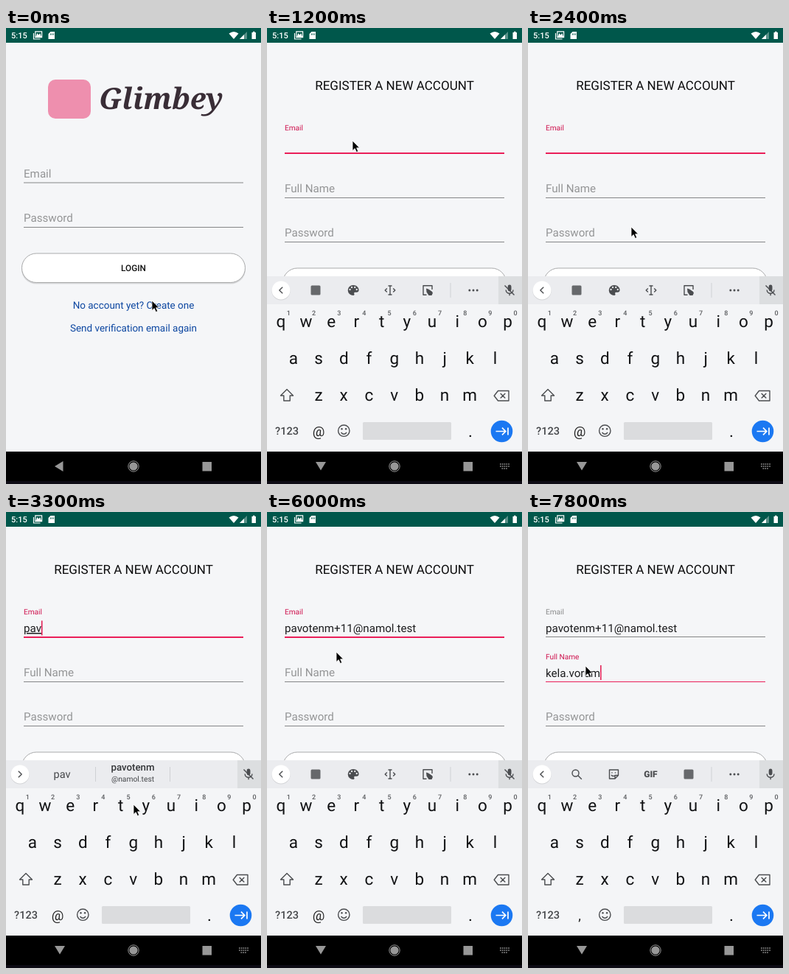
Write an HTML page that moves like this. It is 346x619 px and loops after 8000 ms.

```html
<!DOCTYPE html>
<html lang="en">
<head>
<meta charset="utf-8">
<title>Register</title>
<style>
  html, body { margin: 0; width: 100%; height: 100%; overflow: hidden; background: #f5f6f8; }
  svg { display: block; width: 100vw; height: 100vh; }
  text { font-family: Roboto, "Noto Sans", sans-serif; white-space: pre; text-rendering: geometricPrecision; }
  .mid { text-anchor: middle; }
  .hint { font-size: 15.15px; fill: #949596; }
  .value { font-size: 15.15px; fill: #1d1d1f; }
  .label { font-size: 10.1px; fill: #8a8b8c; }
  .line { stroke: #858687; stroke-width: 1; }
  .on .label { fill: #cf1550; }
  .on .line { stroke: #ea1e58; stroke-width: 2; transform: translateY(.5px); }
  #name.on .line { stroke-width: 1.2; transform: none; }
  .under { text-decoration: underline; text-decoration-thickness: 1px; }
  .pill { fill: #fff; stroke: #a9aaab; stroke-width: 1; }
  .shade { fill: #000; opacity: .13; }
  .cap { font-size: 11.8px; font-weight: 500; fill: #111; text-anchor: middle; }
  .link { font-size: 13.47px; fill: #0d47a1; text-anchor: middle; }
  .brand { font: italic bold 40px "Noto Serif", "Liberation Serif", serif; fill: #392d36; }
  .key { font-size: 22.5px; fill: #111214; text-anchor: middle; }
  .digit { font-size: 9px; font-weight: 500; fill: #5b5d60; text-anchor: middle; }
  .stroke { fill: none; stroke: #4b4d50; stroke-width: 1.4; stroke-linejoin: round; }
  .solid { fill: #4b4d50; }
  .badge { fill: #66686b; }
  .word { font-size: 14.5px; fill: #45474a; text-anchor: middle; }
  .sep { stroke: #cfd1d4; }
</style>
</head>
<body>
<svg viewBox="0 0 346 619" preserveAspectRatio="none">
  <rect width="346" height="619" fill="#f5f6f8"/>

  <g id="login">
    <rect x="57" y="70" width="58" height="53" rx="10" fill="#ee8fae"/>
    <text class="brand" x="126" y="110">Glimbey</text>
    <text class="hint" x="24" y="203">Email</text>
    <path class="line" d="M24 210H322"/>
    <text class="hint" x="24" y="263">Password</text>
    <path class="line" d="M24 270.5H322"/>
    <rect class="shade" x="21" y="307.5" width="304" height="40" rx="20"/>
    <rect class="pill" x="21.5" y="306" width="303" height="39.5" rx="19.7"/>
    <text class="cap" x="173" y="330">LOGIN</text>
    <text class="link" x="173" y="381">No account yet? Create one</text>
    <text class="link" x="173" y="412">Send verification email again</text>
  </g>

  <g id="register">
    <text class="mid" x="173" y="84" font-size="17.05" fill="#0c0c0d">REGISTER A NEW ACCOUNT</text>
    <g id="email">
      <text class="hint" x="24" y="162">Email</text>
      <text class="label" x="24" y="139">Email</text>
      <text class="value" x="24" y="163"></text>
      <path class="line" d="M24 169.5H322"/>
    </g>
    <g id="name">
      <text class="hint" x="24" y="223">Full Name</text>
      <text class="label" x="24" y="200">Full Name</text>
      <text class="value" x="24" y="224"></text>
      <path class="line" d="M24 230.5H322"/>
    </g>
    <text class="hint" x="24" y="283">Password</text>
    <path class="line" d="M24 290.5H322"/>
    <rect class="shade" x="21" y="327.5" width="304" height="40" rx="20"/>
    <rect class="pill" x="21.5" y="326" width="303" height="39.5" rx="19.7"/>
    <text class="cap" x="173" y="350">REGISTER</text>
    <rect id="caret" width="1.5" height="20" fill="#e2174f"/>
    <path id="handle" d="M90.7 169L97 173.3A8.6 8.6 0 1 1 84.4 173.3Z" fill="#f0285f"/>
  </g>

  <g id="board">
    <rect y="337" width="346" height="38" fill="#ebecef"/>
    <rect y="375" width="346" height="200" fill="#f4f5f7"/>
    <rect x="314" y="337" width="32" height="38" fill="#dcdee0"/>
    <circle cx="19" cy="356.7" r="12.7" fill="#000" opacity=".1"/>
    <circle cx="19" cy="356" r="12.5" fill="#fff"/>
    <path id="chevron" class="stroke" d="M2.2 -4.2L-2.2 0L2.2 4.2"/>

    <g id="tools">
      <rect class="badge" x="59.5" y="349.5" width="13" height="13" rx="1.5"/>
      <path class="solid" fill-rule="evenodd" d="M117 349a7.3 7 0 1 0 0 14c2 0 1.6-1.5 1.2-2.4c-.4-1 .3-1.8 1.4-1.8h2c1.7 0 3-1.3 3-3c0-4-3.6-6.8-7.6-6.8zm-4.5 7.2a1.2 1.2 0 1 1 .1 0zm2.5-3a1.2 1.2 0 1 1 .1 0zm4.2 0a1.2 1.2 0 1 1 .1 0zm2.5 3a1.2 1.2 0 1 1 .1 0z"/>
      <path class="stroke" d="M164.5 350h5M164.5 362h5M167 350v12M162.8 353.5l-2.6 2.5l2.6 2.5M171.2 353.5l2.6 2.5l-2.6 2.5"/>
      <path class="stroke" d="M224 355v-5.3h-12v12.6h4.5"/>
      <path class="solid" d="M216 353.5l3 1l4.5 3l1.5 2l-1.5 3.5h-4l-3-4.5z"/>
    </g>

    <g id="search">
      <circle class="stroke" cx="64.5" cy="354.5" r="4.5"/>
      <path class="stroke" d="M67.8 357.8l5 5"/>
      <path class="stroke" d="M110.5 350h12v7.5l-4.5 4.5h-7.5zM122.5 357.5h-4.5v4.5M113 357q2 2.5 4.5 1M114 353.3v1.2M118.5 353.3v1.2"/>
      <text class="mid solid" x="166.5" y="360.3" font-size="12" font-weight="800">GIF</text>
      <rect class="badge" x="211.5" y="349.5" width="13" height="13" rx="1.5"/>
    </g>

    <g id="more">
      <path class="sep" d="M249 346v20"/>
      <g class="solid">
        <circle cx="274.8" cy="356" r="1.5"/><circle cx="280" cy="356" r="1.5"/><circle cx="285.2" cy="356" r="1.5"/>
      </g>
    </g>

    <g id="words">
      <path class="sep" d="M121.5 346v20M222.5 346v20"/>
      <text id="typed" class="word" x="76" y="361"></text>
      <g id="offer">
        <text class="mid" x="172" y="351" font-size="13.3" font-weight="500" fill="#333538">pavotenm</text>
        <text class="mid" x="172" y="366" font-size="10.3" fill="#45474a">@namol.test</text>
      </g>
    </g>

    <rect class="solid" x="326.7" y="348.5" width="4.8" height="9" rx="2.4"/>
    <path class="stroke" d="M324.2 355.5a4.9 4.8 0 0 0 9.8 0M329.1 360.2v3"/>
    <path id="slash" class="stroke" d="M322.5 349.5l13 13"/>

    <g id="keys"></g>
    <path class="stroke" d="M27 490.5l8.5 8.5h-4.3v7h-8.4v-7h-4.3z"/>
    <path class="stroke" d="M313.5 492.5h14.5v13.5h-14.5l-5.3-6.7zM316.7 496l6.6 6.6M323.3 496l-6.6 6.6"/>
    <text class="mid" x="27" y="552" font-size="14.5" font-weight="500" fill="#45474a">?123</text>
    <text id="mark" class="mid" x="70" y="554" font-size="18.5" fill="#222"></text>
    <circle class="stroke" cx="104.3" cy="546.7" r="7.7"/>
    <path class="stroke" d="M100.5 549q3.8 4.6 7.6 0"/>
    <circle class="solid" cx="101.5" cy="544.3" r="1.2"/><circle class="solid" cx="107.1" cy="544.3" r="1.2"/>
    <rect x="130" y="535" width="120" height="24" rx="1.5" fill="#dbdcde"/>
    <text class="key" x="276" y="555">.</text>
    <circle cx="318.5" cy="547.5" r="14.8" fill="#1b78f2"/>
    <path d="M310.5 547.5h13M319 542.7l4.8 4.8l-4.8 4.8M327 542.5v10" fill="none" stroke="#fff" stroke-width="1.7"/>
  </g>

  <rect width="346" height="20" fill="#00574b"/>
  <text x="7" y="14" font-size="11" font-weight="500" fill="#fff">5:15</text>
  <path d="M37.5 7v8h9M39.8 4.9h8.8v7.8h-8.8z" fill="none" stroke="#fff" stroke-width="1.2"/>
  <path d="M40.5 12l1.8-5l2 2.5l2-2.5l1.7 5z" fill="#fff"/>
  <path fill="#fff" fill-rule="evenodd" d="M60.5 5h5.5v10h-8.5v-7zM60 7.5v2h1v-2zM62 7.5v2h1v-2zM64 7.5v2h1v-2z"/>
  <path d="M302.5 7.5q6.5-5 13 0l-6.5 7.500z" fill="#fff"/>
  <path d="M327 5v10h-10z" fill="#fff" opacity=".35"/>
  <path d="M323 9v6h-6z" fill="#fff"/>
  <path d="M333.5 6h1.5v-1.2h2.5v1.2h1.5v9h-5.5z" fill="#fff"/>

  <rect y="575" width="346" height="44"/>
  <rect y="615" width="346" height="4" fill="#0d0b14"/>
  <path id="back" d="M66 595l11.5-7v14z" fill="#979797"/>
  <path id="down" d="M66 589h14l-7 11.5z" fill="#979797"/>
  <circle cx="173" cy="595" r="5.6" fill="#979797"/>
  <circle cx="173" cy="595" r="7.2" fill="none" stroke="#979797"/>
  <rect x="266.5" y="589" width="12.5" height="12.5" fill="#979797"/>
  <path id="pad" d="M316 592h13M316 595h13M318.5 598h8" stroke="#929292" stroke-width="1.7" stroke-dasharray="1.7 1.1"/>

  <path id="pointer" d="M0 0V13.5L3.2 10.6L5.4 15.5L7.7 14.5L5.6 9.8H9.6Z" fill="#000" stroke="#fff" stroke-width=".8"/>
</svg>

<script>
const LOOP = 8000, STEP = 300, LEFT = 24;
const USER = 'pavotenm', HOST = '@namol.test';
const $ = id => document.getElementById(id);
const show = (id, on) => { $(id).style.display = on ? '' : 'none'; };

function addKey(cls, x, y, char) {
  const node = document.createElementNS('http://www.w3.org/2000/svg', 'text');
  node.setAttribute('class', cls);
  node.setAttribute('x', x);
  node.setAttribute('y', y);
  node.textContent = char;
  $('keys').append(node);
}

[['qwertyuiop', 18.8, 406], ['asdfghjkl', 35.9, 456], ['zxcvbnm', 70, 505.5]].forEach(([row, x0, y], r) => {
  [...row].forEach((char, i) => {
    const x = x0 + i * 34.2;
    addKey('key', x, y, char);
    if (r === 0) addKey('digit', x + 10.5, 390, (i + 1) % 10);
  });
});

// Each entry lists what changes at that step; the rest carries over.
const changes = [
  { x: 198, y: 370, page: 'login', focus: '', bar: '', email: '', name: '', word: '',
    tail: 0, caret: 0, handle: 0, under: 0 },
  { x: 200, y: 374 },
  { x: 202, y: 379, page: 'register' },
  { x: 165, y: 270 },
  { x: 116, y: 153, focus: 'email', bar: 'tools' },
  { caret: 1 },
  { caret: 0 },
  { caret: 1 },
  { x: 140, y: 270, caret: 0 },
  { x: 173, y: 397, email: 'p', word: 'p', bar: 'words', caret: 1, under: 1 },
  { email: 'pa', word: 'pa' },
  { email: 'pav', word: 'pav' },
  { x: 172, y: 357 },
  { email: USER + HOST, bar: 'tools', under: 0 },
  { x: 125, y: 240, caret: 0 },
  { x: 90, y: 153, handle: 1 },
  {},
  { email: USER + '+' + HOST, tail: HOST.length, handle: 0, caret: 1 },
  { email: USER + '+1' + HOST, word: '1', bar: 'words' },
  { email: USER + '+11' + HOST, word: '11' },
  { x: 94, y: 190, caret: 0, bar: 'tools' },
  { x: 78, y: 209, focus: 'name', caret: 1, tail: 0, bar: 'search' },
  { name: 'ke', word: 'ke', bar: 'words', under: 1 },
  { name: 'kela', word: 'kela' },
  { name: 'kela.vo', word: 'vo' },
  { name: 'kela.vorum', word: 'vorum' },
  { bar: 'search', under: 0 }
];
let last = {};
const states = changes.map(c => (last = { ...last, ...c }));

function drawField(id, s) {
  const field = $(id), on = s.focus === id, text = s[id];
  const [hint, label, value] = field.children;
  const lifted = on || text !== '';
  field.setAttribute('class', on ? 'on' : '');
  hint.style.display = lifted ? 'none' : '';
  label.style.display = lifted ? '' : 'none';
  value.textContent = text;
  value.classList.toggle('under', on && !!s.under);
  if (!on) return;
  const count = text.length - s.tail;
  const width = count ? value.getSubStringLength(0, count) : 0;
  $('caret').setAttribute('x', LEFT + width);
  $('caret').setAttribute('y', id === 'email' ? 147.5 : 208);
}

function draw(s) {
  const open = s.bar !== '', words = s.bar === 'words', naming = s.focus === 'name';
  show('login', s.page === 'login');
  show('register', s.page === 'register');
  show('board', open);
  show('down', open);
  show('pad', open);
  show('back', !open);
  show('tools', s.bar === 'tools');
  show('search', s.bar === 'search');
  show('more', !words);
  show('words', words);
  show('offer', USER.startsWith(s.word));
  show('slash', !naming);
  show('caret', s.caret);
  show('handle', s.handle);
  $('typed').textContent = s.word;
  $('mark').textContent = naming ? ',' : '@';
  $('chevron').setAttribute('transform', `translate(19 356) scale(${words ? -1 : 1} 1)`);
  $('pointer').setAttribute('transform', `translate(${s.x} ${s.y})`);
  if (s.page === 'register') {
    drawField('email', s);
    drawField('name', s);
  }
}

let shown = -1;
function tick() {
  const step = Math.floor(performance.now() % LOOP / STEP);
  if (step !== shown) draw(states[shown = step]);
  requestAnimationFrame(tick);
}
tick();
</script>
</body>
</html>
```
